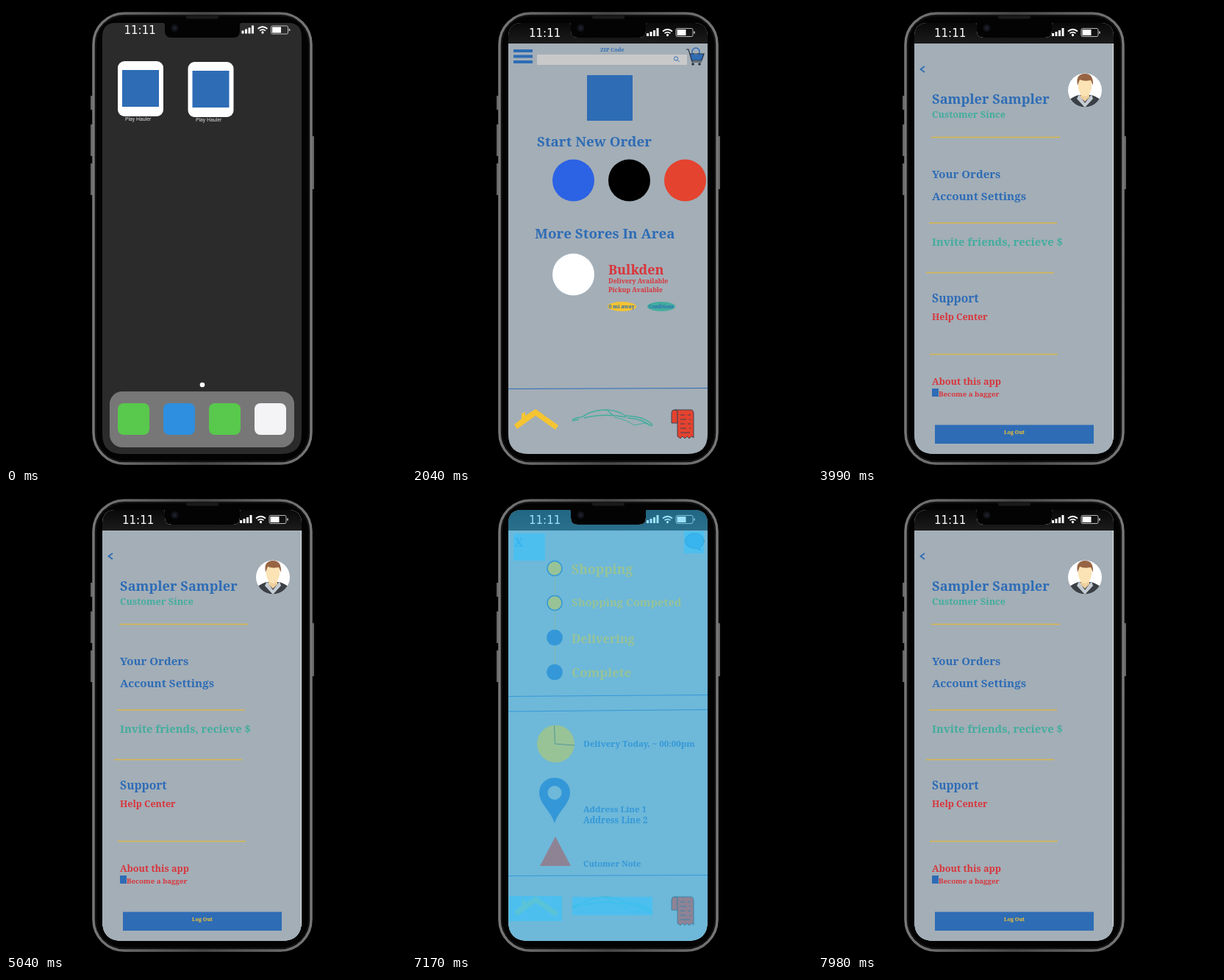
Animation, 544 px wide and 624 px high, one loop 8 s. Source, as an HTML page:

```html
<!DOCTYPE html>
<html lang="en">
<head>
<meta charset="utf-8">
<title>Shopping app prototype</title>
<style>
  html, body { margin: 0; width: 100%; height: 100%; overflow: hidden; background: #000; }
  svg { display: block; width: 544px; height: 624px; }
  text { font: bold 15px "Noto Serif", serif; white-space: pre; }
  .clock { font: 15px "DejaVu Sans", sans-serif; fill: #fff; }
  .label { font: 7px Roboto, sans-serif; fill: #ddd; }
  .blue { fill: #2e6cb5; }
  .yellow { fill: #f5c432; }
  .red { fill: #e4432f; }
  .crimson { fill: #d9353b; }
  .teal { fill: #43ad9d; }
  .rule { stroke: #2e6cb5; stroke-width: 1; }
  .gold { stroke: #d9b649; stroke-width: 1.4; }
</style>
</head>
<body>
<svg viewBox="0 0 544 624">
  <defs>
    <clipPath id="display">
      <path d="M149 23H214Q216 23 216 27V34Q216 43 225 43H309Q318 43 318 34V27Q318 23 320 23H384Q402 23 402 42V582Q402 609 375 609H158Q131 609 131 582V42Q131 23 149 23Z"/>
    </clipPath>
    <linearGradient id="edge" x2="1" y2="0">
      <stop offset="0" stop-color="#777"/><stop offset=".5" stop-color="#484848"/><stop offset="1" stop-color="#777"/>
    </linearGradient>
    <linearGradient id="bar" x2="0" y2="1">
      <stop offset="0" stop-color="#080808"/><stop offset="1" stop-color="#1c1c1c"/>
    </linearGradient>

    <g id="status">
      <text class="clock" x="0" y="5.5">11:11</text>
      <path fill="#fff" d="M160 1h3v4h-3zM164.500-1h3v6h-3zM169-3h3v8h-3zM173.500-6h3v11h-3z"/>
      <g fill="none" stroke="#fff" stroke-width="1.7">
        <path d="M182-1.500Q188.500-7 195-1.500M184.500 1.200Q188.500-2 192.500 1.200"/>
        <circle cx="188.500" cy="3.500" r=".8"/>
        <rect x="200" y="-5.500" width="23" height="11" rx="2" stroke="#bbb" stroke-width="1"/>
        <path d="M225-1.500v3" stroke="#bbb"/>
      </g>
      <rect x="201.500" y="-4" width="12" height="8" fill="#fff"/>
    </g>

    <g id="page">
      <rect x="130" y="22" width="273" height="588" fill="#a3aeb7"/>
      <rect x="130" y="22" width="273" height="29" fill="url(#bar)"/>
    </g>

    <g id="tabs">
      <path class="rule" d="M131 520.500L402 519.500"/>
      <path class="yellow" d="M139 569L149 561V554L154 552V557L168 548L199 570L195 576L168 557L143 575Z"/>
      <g fill="none" stroke="#43ad9d" stroke-width="1.500">
        <path d="M218 563Q223 559 231 559Q244 549 265 549Q281 550 290 557Q318 558 327 570"/>
        <path d="M234 560Q264 553 291 559M266 550L273 556M293 560Q312 561 325 571M218 564L227 562"/>
        <path d="M275 559Q291 562 302 570L316 567L327 571" stroke-width="1"/>
      </g>
      <path class="red" d="M357 549H379Q383 549 383 554V587L380 585L377 588L374 585L371 588L368 585L365 588L361 585V567H353V553Q353 549 357 549Z" stroke="#3e4552"/>
      <path d="M361 567V553Q361 549 357 549M365 556h6m4 0h4M365 562h8m4 0h2M365 568h6m4 0h4M365 574h8m4 0h2M365 580h13" fill="none" stroke="#3e4552" stroke-width="1.200"/>
    </g>

    <g id="appIcon">
      <rect width="62" height="75" rx="9" fill="#fff"/>
      <rect class="blue" x="6" y="12" width="50" height="50"/>
    </g>
  </defs>

  <!-- phone body -->
  <g fill="#666">
    <path d="M115 122h3v19h-3zM115 161h3v43h-3zM115 214h3v43h-3zM416 177h3v72h-3z"/>
  </g>
  <rect x="119" y="10" width="296" height="612" rx="42" fill="#030303" stroke="url(#edge)" stroke-width="3.500"/>
  <rect x="122" y="13" width="290" height="606" rx="39" fill="none" stroke="#1d1d1d"/>
  <rect x="245" y="12.500" width="44" height="5" rx="2" fill="#191919"/>

  <g clip-path="url(#display)">
    <g id="home">
      <rect x="130" y="22" width="273" height="588" fill="#2b2b2b"/>
      <use href="#status" x="160.500" y="32.500"/>
      <use href="#appIcon" x="152" y="75"/>
      <use href="#appIcon" x="247.500" y="76"/>
      <text class="label" x="162" y="156">Play Hauler</text>
      <text class="label" x="258" y="157">Play Hauler</text>
      <circle cx="267" cy="515" r="3.300" fill="#fff"/>
      <rect x="141" y="524" width="251" height="76" rx="17" fill="#777"/>
      <rect x="152" y="540" width="43" height="43" rx="8" fill="#58c94c"/>
      <rect x="214" y="540" width="43" height="43" rx="8" fill="#2e8fe0"/>
      <rect x="276" y="540" width="43" height="43" rx="8" fill="#58c94c"/>
      <rect x="338" y="540" width="43" height="43" rx="8" fill="#f4f3f5"/>
    </g>

    <g id="store">
      <use href="#page"/>
      <use href="#status" x="159" y="36"/>
      <path class="blue" d="M138 59h26v4h-26zM138 66.500h26v4h-26zM138 74h26v4h-26z"/>
      <rect x="170" y="66" width="204" height="14" fill="#c9c9c9"/>
      <g fill="none" stroke="#2e6cb5"><circle cx="359" cy="71.500" r="2.600"/><path d="M361 73.500l2.500 2.500"/></g>
      <path class="blue" d="M378 65H397L394 74H380Z"/>
      <circle cx="386" cy="62" r="5" fill="#a3aeb7" stroke="#2e6cb5" stroke-width="1.500"/>
      <path d="M373 59h3l5 17h13M378 65h19l-3 9h-14" fill="none" stroke="#26303d" stroke-width="1.200"/>
      <g fill="#26303d"><circle cx="382" cy="79" r="1.800"/><circle cx="391" cy="79" r="1.800"/></g>
      <rect class="blue" x="238" y="94" width="62" height="62"/>
      <circle cx="219.500" cy="237" r="28.500" fill="#2c62e4"/>
      <circle cx="295.500" cy="237" r="28.500"/>
      <circle class="red" cx="371.500" cy="237" r="28.500"/>
      <circle cx="219.500" cy="365" r="28.500" fill="#fff"/>
      <ellipse class="yellow" cx="285.500" cy="408.500" rx="19.500" ry="6.500"/>
      <ellipse class="teal" cx="339" cy="408.500" rx="19" ry="6.500"/>
    </g>

    <g id="tracker">
      <use href="#page"/>
      <use href="#status" x="159" y="36"/>
      <path d="M384 55C376 55 371.500 60 371.500 65.500S377 75 383 75Q389 75 392 78Q391 75 391.500 73.500C395 72 397 69 397 65.500C397 60 392 55 384 55Z" class="blue" stroke="#10264a"/>
      <path d="M194.500 103V243" stroke="#c9b455"/>
      <g class="yellow" stroke="#2e6cb5" stroke-width="1.500"><circle cx="194" cy="102.500" r="10"/><circle cx="194" cy="149.500" r="10"/></g>
      <g class="blue"><circle cx="194" cy="196.500" r="10.800"/><circle cx="194" cy="243.500" r="10.800"/></g>
      <path class="rule" d="M131 276.500L402 274.500M131 297L402 294.500"/>
      <circle class="yellow" cx="195.500" cy="341" r="25.500"/>
      <path d="M193.500 316L194.500 341L221 343" fill="none" stroke="#6b6a3e"/>
      <path class="blue" fill-rule="evenodd" d="M194 449C189 432 173 423 173 407A21 20 0 0 1 215 407C215 423 199 432 194 449ZM194 398A9.500 9.500 0 1 0 194 417A9.500 9.500 0 1 0 194 398Z"/>
      <path class="red" d="M195 467L216 507H174Z"/>
    </g>

    <g id="flash" fill="#3bc3fc" fill-opacity=".5">
      <path d="M130 22h273v588h-273z"/>
      <path d="M138 55h43v37h-43zM370 52h27v30h-27zM132 548h72v34h-72zM218 549h109v25h-109z" fill-opacity=".65"/>
    </g>

    <g id="menu">
      <use href="#page"/>
      <use href="#status" x="158" y="36"/>
      <path d="M401.500 51V595" stroke="#e8e8e8"/>
      <path d="M145 82L139.500 86L145 90" fill="none" stroke="#2e6cb5" stroke-width="1.800"/>
      <clipPath id="portrait"><circle cx="363" cy="114.500" r="23"/></clipPath>
      <g clip-path="url(#portrait)">
        <path d="M339 91h48v48h-48z" fill="#fff"/>
        <path d="M340 138V131Q342 125 354 121H372Q384 125 386 131V138Z" fill="#3b4047"/>
        <path d="M355 120L363 132L372 120L374 126L363 138L352 126Z" fill="#c6ccd3"/>
        <path d="M357 116h12v8l-6 6l-6-6z" fill="#efcf9c"/>
        <path d="M354 100Q363 94 372 100V112Q370 122 363 123Q356 122 354 112Z" fill="#fbe3b5"/>
        <path d="M353 108Q350 93 362 92Q375 91 374 108L371 101Q361 103 356 100Z" fill="#976443"/>
      </g>
      <path class="gold" d="M154 178.500H329M151 295H325M147 362.500H321M152 473.500H326"/>
      <rect class="blue" x="155" y="520" width="9" height="11"/>
      <rect class="blue" x="159" y="569.500" width="216" height="25.500"/>
    </g>
  </g>
  <circle cx="229.500" cy="30" r="5" fill="#111319"/><circle cx="229.500" cy="30" r="2" fill="#20222d"/>
</svg>

<script>
const LOOP = 8000;
const part = id => document.getElementById(id);

// Each entry: text, x, baseline, size, colour class
const copy = {
  store: [
    ["ZIP Code", 256, 61.500, 7.300, "blue"],
    ["Start New Order", 170, 191, 18.800, "blue"],
    ["More Stores In Area", 167, 315.500, 18.800, "blue"],
    ["Bulkden", 267, 365, 18, "crimson"],
    ["Delivery Available", 267, 377, 8.700, "crimson"],
    ["Pickup Available", 267, 389, 8.700, "crimson"],
    ["0 mi away", 267.500, 411, 7, "blue"],
    ["Conditions", 322, 411, 6.200, "blue"]
  ],
  tracker: [
    ["X", 139, 73, 17, "blue"],
    ["Shopping", 217, 109.500, 17.600, "yellow"],
    ["Shopping Competed", 217, 154, 14.800, "yellow"],
    ["Delivering", 217, 203.500, 16.100, "yellow"],
    ["Complete", 217, 250, 16.900, "yellow"],
    ["Delivery Today, ~ 00:00pm", 233, 345, 11.600, "blue"],
    ["Address Line 1", 233, 433.500, 11.600, "blue"],
    ["Address Line 2", 233, 448.500, 11.800, "blue"],
    ["Cutomer Note", 233, 507.500, 11.100, "blue"]
  ],
  menu: [
    ["Sampler Sampler", 155, 133, 18.200, "blue"],
    ["Customer Since", 155, 151.500, 12.700, "teal"],
    ["Your Orders", 155, 234, 15, "blue"],
    ["Account Settings", 155, 264, 15.200, "blue"],
    ["Invite friends, recieve $", 155, 325.500, 14.800, "teal"],
    ["Support", 155, 403, 15.600, "blue"],
    ["Help Center", 155, 426.500, 12.500, "crimson"],
    ["About this app", 155, 515, 12.700, "crimson"],
    ["Become a bagger", 164, 530.500, 9.700, "crimson"],
    ["Log Out", 253, 582, 7.100, "yellow"]
  ]
};

for (const [screen, lines] of Object.entries(copy)) {
  for (const [words, x, y, size, colour] of lines) {
    const text = document.createElementNS("http://www.w3.org/2000/svg", "text");
    text.setAttribute("x", x);
    text.setAttribute("y", y);
    text.setAttribute("class", colour);
    text.style.fontSize = size + "px";
    text.textContent = words;
    part(screen).append(text);
  }
}
part("tracker").append(Object.assign(part("tabs").cloneNode(true), { id: "trackerTabs" }));
part("store").append(Object.assign(part("tabs").cloneNode(true), { id: "storeTabs" }));

// Eased 0 to 1 between start and start + length
function ramp(t, start, length) {
  const p = Math.min(1, Math.max(0, (t - start) / length));
  return 1 - (1 - p) ** 2;
}

function show(id, opacity) {
  part(id).style.opacity = opacity;
  part(id).style.display = opacity > 0 ? "" : "none";
}

function draw(now) {
  const t = now % LOOP;
  show("store", ramp(t, 620, 300));
  show("menu", ramp(t, 3500, 300) - ramp(t, 5700, 300) + ramp(t, 7480, 300));
  show("tracker", t > 4500 ? 1 : 0);
  show("flash", ramp(t, 7060, 100) - ramp(t, 7260, 200));
}

const start = performance.now();
function tick() {
  draw(performance.now() - start);
  requestAnimationFrame(tick);
}
tick();
</script>
</body>
</html>
```
